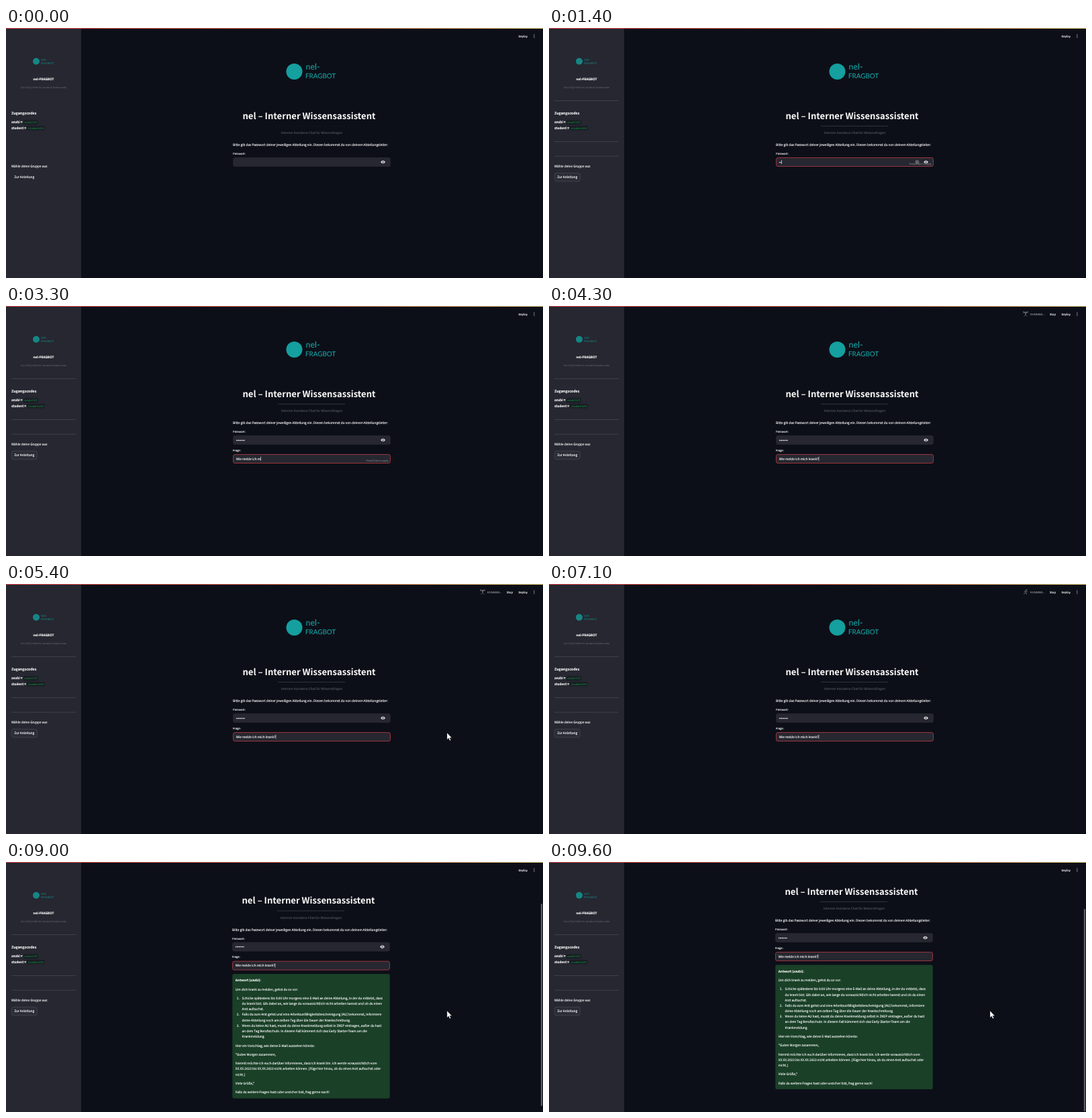
Write an HTML page that moves like this. It is 800x373 px and loops after 9700 ms.

```html
<!DOCTYPE html>
<html lang="de">
<head>
<meta charset="utf-8">
<title>Interner Wissensassistent</title>
<style>
  html, body { margin: 0; width: 100%; height: 100%; overflow: hidden; background: #0d0f18; }
  svg { display: block; width: 800px; height: 373px; }
  text {
    font: 4.76px "Noto Sans CJK JP", "Noto Sans CJK SC", "Noto Sans CJK", "Noto Sans", sans-serif;
    color: #fafafa; fill: currentColor; stroke: currentColor; stroke-width: .13;
    white-space: pre; text-rendering: geometricPrecision;
  }
  .bold { font-weight: 700; }
  .mid { text-anchor: middle; }
  .label { font-size: 4.16px; }
  .tiny { font-size: 3.58px; }
  .grey { color: #6b6d75; stroke: none; }
  .hint { font-size: 3.58px; color: #9c9da3; stroke: none; }
  .status { color: #8d8f96; }
  .head { font-size: 5.37px; }
  .title { font-size: 13.1px; stroke: none; }
  .brand { font-family: Lato, sans-serif; color: #159f9f; }
  .small { color: #168585; stroke: none; }
  .code { font: italic 3.95px "Noto Sans Mono", monospace; color: #0ba33c; stroke: none; }
  .dots { font: 4.7px "Liberation Sans", sans-serif; }
  .line { stroke: #50515a; stroke-width: .6; }
  .field { fill: #262730; stroke: #262730; stroke-width: .8; }
  .field.on { stroke: #bb3a43; }
  .caret { fill: #fafafa; }
  .pose { fill: none; stroke: #8d8f96; stroke-width: .6; stroke-linecap: round; }
</style>
</head>
<body>
<svg viewBox="0 0 800 373">
  <defs>
    <linearGradient id="rainbow">
      <stop stop-color="#de4049"/><stop offset=".5" stop-color="#e06a50"/><stop offset="1" stop-color="#e6d27a"/>
    </linearGradient>
    <g id="eye">
      <path d="M-3.4 0Q0 -4.6 3.4 0Q0 4.6 -3.4 0Z" fill="#fafafa"/>
      <circle r="1.5" fill="#262730"/><circle r=".8" fill="#fafafa"/>
    </g>
  </defs>
  <rect width="800" height="373" fill="#0d0f18"/>

  <g id="page">
    <circle cx="429.5" cy="65" r="12" fill="#159f9f"/>
    <text class="brand" x="446.5" y="62.3" style="font-size:12.4px">nel-</text>
    <text class="brand" x="446" y="75" style="font-size:9.9px">FRAGBOT</text>
    <text class="title bold mid" x="451.5" y="135.6">nel – Interner Wissensassistent</text>
    <path class="line soft" d="M405 146.3H505"/>
    <text class="grey mid" x="455.5" y="158">Interner Assistenz-Chat für Wissensfragen</text>
    <text x="338" y="176.1">Bitte gib das Passwort deiner jeweiligen Abteilung ein. Diesen bekommst du von deinem Abteilungsleiter:</text>

    <text class="label" x="338" y="189">Passwort:</text>
    <rect id="passField" class="field" x="338.5" y="193.5" width="234" height="13" rx="2.6"/>
    <text id="pass" class="dots" x="342.8" y="201.7"></text>
    <g id="keyIcon" fill="none" stroke="#b5b6ba" stroke-width=".6">
      <circle cx="548.5" cy="200" r="2.5"/><path d="M547 200h3M548.5 198.5v3"/>
    </g>
    <use href="#eye" x="561.6" y="200"/>
    <text id="passHint" class="hint" x="536.6" y="203.9">Press Enter to apply</text>

    <g id="ask">
      <text class="label" x="338" y="216.9">Frage:</text>
      <rect id="askField" class="field" x="338.5" y="221.5" width="234" height="13" rx="2.6"/>
      <text id="question" x="342.8" y="229.5"></text>
      <text id="askHint" class="hint" x="536.6" y="231.5">Press Enter to apply</text>
    </g>
    <rect id="caret" class="caret" width=".6" height="6"/>
    <g id="answer"><rect x="338.3" y="240.5" width="234.5" height="185.6" rx="2.6" fill="#1a4028"/></g>
  </g>

  <rect x="112" width="688" height="19" fill="#0d0f18"/>
  <rect id="thumb" x="796.8" width="2.2" height="302" rx="1.1" fill="#5d6068"/>

  <g id="running">
    <g class="pose"><path d="M707 9.2H713M707 8v2.4M713 8v2.4M708.2 9.4L710 12L711.8 9.4M710 11.6V13L707.8 15.2M710 13L712.2 15.2"/><circle cx="710" cy="10" r=".5"/></g>
    <g class="pose"><circle cx="707.6" cy="13.7" r="1.6"/><circle cx="712.4" cy="13.7" r="1.6"/><path d="M707.6 13.7L709.2 11.5L711.6 10.8L712.4 13.7M709.2 11.5L710.3 13.8M709 11.4L710.6 9.4"/><circle cx="711.4" cy="9" r=".5"/></g>
    <g class="pose"><path d="M710.6 10.2L709.7 12.6L711.4 13.6L711 15.4M709.7 12.6L708.9 14.2L707.2 14.4M708 11.8L708.8 10.4L710.6 10.4L711.6 11.8L712.6 11.4"/><circle cx="711.2" cy="8.8" r=".6"/></g>
    <text class="label status" x="717" y="13.5">RUNNING...</text>
    <text class="label" x="746" y="13.5">Stop</text>
  </g>
  <text class="label" x="763.4" y="13.5">Deploy</text>
  <g fill="#fafafa"><circle cx="786.8" cy="10" r=".6"/><circle cx="786.8" cy="12" r=".6"/><circle cx="786.8" cy="14" r=".6"/></g>

  <rect width="112" height="373" fill="#262730"/>
  <circle cx="45" cy="49.7" r="5" fill="#168585"/>
  <text class="brand small" x="52" y="49" style="font-size:5.2px">nel-</text>
  <text class="brand small" x="52" y="54.1" style="font-size:4.2px">FRAGBOT</text>
  <text class="bold mid" x="56" y="78.2">nel-FRAGBOT</text>
  <text class="tiny grey mid" x="56" y="90.2">Dein FAQ-Helfer für Azubis &amp; Studierende</text>
  <path class="line soft" d="M8 108.5H104M8 169.5H104M8 191.3H104"/>
  <text class="head bold" x="8" y="129">Zugangscodes</text>
  <g fill="#1a1c24"><rect x="26" y="137.6" width="21.6" height="6.6" rx="1"/><rect x="31" y="146" width="26.5" height="6.6" rx="1"/></g>
  <text class="bold" x="8" y="142.4">azubi =</text><text class="code" x="27" y="142.3">azubi123</text>
  <text class="bold" x="8" y="150.8">student =</text><text class="code" x="32.2" y="150.7">student456</text>
  <text x="8" y="207.8">Wähle deine Gruppe aus</text>
  <rect class="line soft" x="8.3" y="216.4" width="38" height="12.4" rx="2.6" fill="#2b2c36"/>
  <text x="12.3" y="224.3">Zur Anleitung</text>

  <rect width="800" height="1" fill="url(#rainbow)"/>
  <path id="mouse" d="M0 0V10.2L2.4 8L4 11.8L5.7 11L4.1 7.4H7.2Z" fill="#fff" stroke="#111" stroke-width=".4"/>
</svg>

<script>
const LOOP = 9700, STEP = 100;
const QUESTION = 'Wie melde ich mich krank?';
const SCROLL = 87;

// x, text, class, list mark; an empty entry starts a new paragraph
const ANSWER = [
  [342.8, 'Antwort (azubi):', 'bold'], [],
  [342.8, 'Um dich krank zu melden, gehst du so vor:'], [],
  [352.6, 'Schicke spätestens bis 9:00 Uhr morgens eine E-Mail an deine Abteilung, in der du mittelst, dass', '', '1.'],
  [352.6, 'du krank bist. Gib dabei an, wie lange du voraussichtlich nicht arbeiten kannst und ob du einen'],
  [352.6, 'Arzt aufsuchst.'],
  [352.6, 'Falls du zum Arzt gehst und eine Arbeitsunfähigkeitsbescheinigung (AU) bekommst, informiere', '', '2.'],
  [352.6, 'deine Abteilung noch am selben Tag über die Dauer der Krankschreibung.'],
  [352.6, 'Wenn du keine AU hast, musst du deine Krankmeldung selbst in ZKEP eintragen, außer du hast', '', '3.'],
  [352.6, 'an dem Tag Berufsschule. In diesem Fall kümmert sich das Early Starter-Team um die'],
  [352.6, 'Krankmeldung.'], [],
  [342.8, 'Hier ein Vorschlag, wie deine E-Mail aussehen könnte:'], [],
  [342.8, '"Guten Morgen zusammen,'], [],
  [342.8, 'hiermit möchte ich euch darüber informieren, dass ich krank bin. Ich werde voraussichtlich vom'],
  [342.8, 'XX.XX.2023 bis XX.XX.2023 nicht arbeiten können. [Füge hier hinzu, ob du einen Arzt aufsuchst oder'],
  [342.8, 'nicht.]'], [],
  [342.8, 'Viele Grüße,"'], [],
  [342.8, 'Falls du weitere Fragen hast oder unsicher bist, frag gerne nach!']
];

// the pointer glides from a to b, then rests until it hides
const MOUSE = [
  { from: 400, glide: 500, hide: 1200, a: [590, 267], b: [480, 198] },
  { from: 4700, glide: 300, hide: 6500, a: [640, 242], b: [657, 222] },
  { from: 8800, glide: 0, hide: LOOP, a: [657, 222], b: [657, 222] }
];

const $ = id => document.getElementById(id);
const softParts = document.querySelectorAll('.soft');
const poses = document.querySelectorAll('.pose');
const clamp = (v, lo = 0, hi = 1) => Math.min(hi, Math.max(lo, v));
const ease = p => p * p * (3 - 2 * p);
const show = (el, on) => { el.style.display = on ? '' : 'none'; };
const move = (el, x, y) => el.setAttribute('transform', `translate(${x} ${y})`);

function addText(parent, x, y, value, cls) {
  const el = document.createElementNS('http://www.w3.org/2000/svg', 'text');
  el.setAttribute('x', x);
  el.setAttribute('y', y);
  if (cls) el.setAttribute('class', cls);
  el.textContent = value;
  parent.append(el);
}

function buildAnswer() {
  let y = 251.7;
  for (const [x, value, cls, mark] of ANSWER) {
    if (!x) { y += 5.12; continue; }
    if (mark) addText($('answer'), 344.8, y, mark);
    addText($('answer'), x, y, value, cls);
    y += 8.19;
  }
}

function typed(id, value) {
  const el = $(id);
  if (el.textContent !== value) el.textContent = value;
  return 342.8 + (value ? el.getComputedTextLength() : 0);
}

function draw(t) {
  const fade = clamp(.1 + t / 500);
  softParts.forEach(el => { el.style.opacity = fade; });

  const dots = clamp(Math.floor((t - 1190) / 85), 0, 8);
  const chars = clamp(Math.floor((t - 2350) / 63), 0, QUESTION.length);
  const passEnd = typed('pass', '•'.repeat(dots));
  const askEnd = typed('question', QUESTION.slice(0, chars));

  const inPass = t >= 900 && t < 2300, inAsk = t >= 2300;
  $('passField').classList.toggle('on', inPass);
  $('askField').classList.toggle('on', inAsk);
  show($('keyIcon'), inPass);
  show($('passHint'), dots > 0 && t < 2000);
  show($('ask'), t >= 2000);
  show($('askHint'), chars > 0 && t < 4200);
  show($('caret'), inPass || inAsk);
  $('caret').setAttribute('x', (inAsk ? askEnd : passEnd) + .2);
  $('caret').setAttribute('y', inAsk ? 224.8 : 197);

  show($('running'), t >= 4200 && t < 8800);
  const pose = Math.floor(t / 200) % poses.length;
  poses.forEach((el, i) => show(el, i === pose));

  const p = ease(clamp((t - 8700) / 400));
  const hasBar = t >= 8600;
  show($('answer'), t >= 8800);
  show($('thumb'), hasBar);
  $('thumb').setAttribute('y', 20 + 50 * p);
  move($('page'), hasBar ? -1 : 0, -SCROLL * p);

  const m = MOUSE.find(s => t >= s.from && t < s.hide);
  show($('mouse'), m);
  if (m) {
    const k = m.glide ? ease(clamp((t - m.from) / m.glide)) : 1;
    move($('mouse'), ...m.a.map((v, i) => v + (m.b[i] - v) * k));
  }
}

function tick() {
  const t = performance.now() % LOOP;
  draw(Math.floor(t / STEP) * STEP);
  requestAnimationFrame(tick);
}

buildAnswer();
tick();
</script>
</body>
</html>
```
